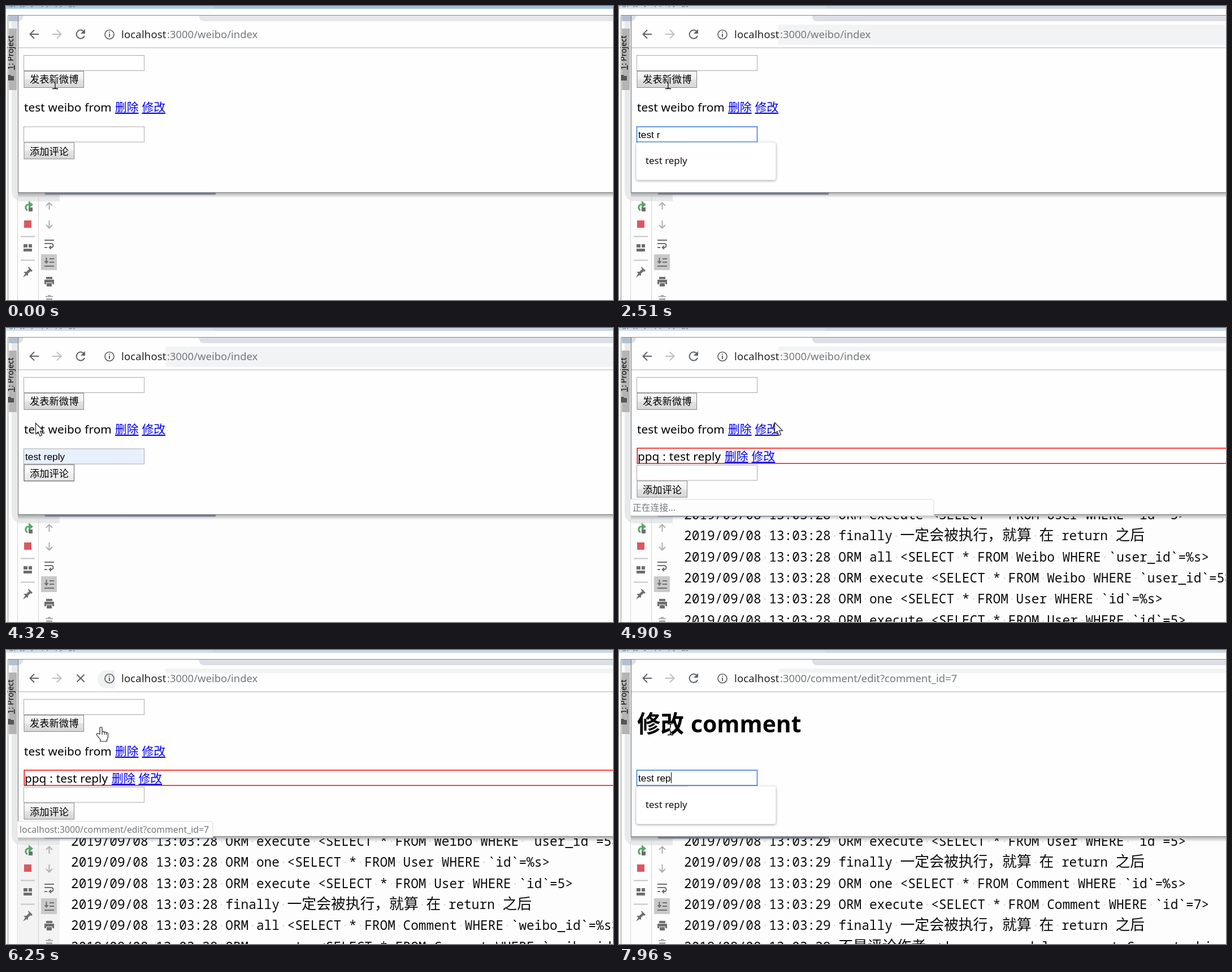
These frames come from a looping animation (1074x521 px, 8000 ms). An HTML page:

```html
<!DOCTYPE html>
<html lang="zh-CN">
<head>
<meta charset="utf-8">
<title>Comment form</title>
<style>
  html, body { margin: 0; width: 100%; height: 100%; overflow: hidden; background: #fdfdfd; }
  svg { display: block; width: 1074px; height: 521px; font-family: "Noto Sans", "Noto Sans CJK SC", sans-serif; }
  text { white-space: pre; }
  .page { font-size: 20.8px; word-spacing: .5px; }
  .link { fill: #00e; text-decoration: underline; }
  .btn { font-size: 17.3px; }
  .url { font-size: 18.45px; fill: #74787c; }
  .host { fill: #222; letter-spacing: .2px; }
  .item { font-size: 16.9px; fill: #111; }
  .status { font-size: 15.8px; fill: #74787c; }
  .field { font: 17.3px "Liberation Sans", sans-serif; }
  .log { font: 22.77px "Noto Sans Mono", monospace; fill: #0c0c0c; }
  .han { font: 300 25.8px "Noto Sans CJK SC", sans-serif; }
  .line { fill: none; stroke: #5f6368; stroke-width: 2; }
  .pop { filter: drop-shadow(0 1px 2px rgba(0,0,0,.4)); }
  #beam { mix-blend-mode: difference; }
</style>
</head>
<body>
<svg viewBox="0 0 1074 521" xmlns="http://www.w3.org/2000/svg">
  <defs>
    <linearGradient id="face" x2="0" y2="1">
      <stop offset="0" stop-color="#f8f8f8"/><stop offset=".48" stop-color="#f0f0f0"/>
      <stop offset=".52" stop-color="#e4e4e4"/><stop offset="1" stop-color="#d6d6d6"/>
    </linearGradient>
    <linearGradient id="shade" x2="0" y2="1">
      <stop offset="0" stop-color="#000" stop-opacity=".3"/><stop offset="1" stop-color="#000" stop-opacity="0"/>
    </linearGradient>
    <clipPath id="logClip"><path d="M96 334H1074V521H96Z"/></clipPath>
    <clipPath id="winClip"><path d="M20 17H1074V521H20Z"/></clipPath>
  </defs>

  <rect width="1074" height="521" fill="#fdfdfd"/>

  <!-- editor around the browser -->
  <g data-t="0-500"><path d="M0 0H1074V5H0Z" fill="#a5bfdd"/><path d="M0 0H368V5H0Z" fill="#adc7e2"/></g>
  <g data-t="500-8000"><path d="M0 0H1074V5H0Z" fill="#c9d6e3"/><path d="M0 0H366V5H0Z" fill="#d0dde8"/></g>
  <text x="5" y="-2" font-size="14" fill="#345" opacity=".6">gp jy  y app  py  gy</text>
  <path d="M21 17V331Q21 344 34 344H95V331H21V17H10V326Q10 346 30 346H95V334H21Z" fill="#e8e9ea"/>
  <path d="M5 17H21V27H5Z" fill="#b3c0cf"/>
  <path d="M5 40H19V149H5Z" fill="#b4b4b4"/>
  <text transform="translate(13 113) rotate(-90)" font-size="13.9"><tspan text-decoration="underline">1</tspan>: Project</text>
  <path d="M4 122H8L9 124H14V132H4Z" fill="#555"/>
  <path d="M3.5 521V16.5H1074" fill="none" stroke="#85898e"/>
  <path d="M22 347H95V521H22Z" fill="#f3f3f3" data-t="5020-6760"/>
  <path d="M20.5 340V521M57.5 338V521" stroke="#d2d2d2"/>
  <path d="M69 331H371V334.5H69Z" fill="#a0a8bd"/>

  <!-- run tool buttons -->
  <path d="M45 352H38A5.5 5.5 0 0 0 38 362" fill="none" stroke="#59a869" stroke-width="3"/>
  <path d="M40 345L48 352L40 359Z" fill="#59a869"/>
  <path d="M40 357H47V364H40Z" fill="#6e6e6e"/>
  <path d="M32 380H45V393H32Z" fill="#db5860"/>
  <path d="M26 408.5H51M26 450.5H51" stroke="#c4c4c4" stroke-width="2"/>
  <path d="M31 422H38V428H31ZM40 422H46V428H40ZM31 430H46V435H31Z" fill="#6e6e6e"/>
  <path d="M40 462L47 469L45 471L43.5 470L39 474L39 478L36 477L30 481L34 474L31 471H36L41 466L39 464Z" fill="#6e6e6e"/>
  <path d="M76.5 361V348M71 354L76.5 348.5L82 354" fill="none" stroke="#afafaf" stroke-width="2"/>
  <path d="M76.5 380V393M71 388L76.5 393.5L82 388" fill="none" stroke="#afafaf" stroke-width="2"/>
  <path d="M68 415H85M68 421H81A3.7 3.7 0 0 1 81 428H77M68 428H73" fill="none" stroke="#6e6e6e" stroke-width="2"/>
  <path d="M80 424V432L75 428Z" fill="#6e6e6e"/>
  <path d="M62 440H90V468H62Z" fill="#c9c9c9"/>
  <path d="M68 461H85M77 448H85M77 454H85M71.5 446V455" stroke="#6e6e6e" stroke-width="2"/>
  <path d="M67.5 452H75.5L71.5 457Z" fill="#6e6e6e"/>
  <path d="M71 480H82V484H71ZM68 485H85V493H82V490H71V493H68ZM72 491H81V497H72Z" fill="#6e6e6e"/>
  <path d="M74 512H79V514H83V516H70V514H74ZM71 518H82V521H71Z" fill="#afafaf"/>

  <g clip-path="url(#logClip)" data-t="4900-8000"><g id="log" class="log"></g></g>

  <!-- browser window -->
  <path d="M21 331H1074V340H21Z" fill="url(#shade)"/>
  <path d="M21 17H1074V331H21Z" fill="#fefefe"/>
  <path d="M341 17H1074V27H351Q342 27 341 17Z" fill="#e7e7eb" data-t="0-500"/>
  <path d="M341 17H1074V27H351Q342 27 341 17Z" fill="#dddfe7" data-t="500-8000"/>
  <path d="M22 17H31Q29 26 22 27Z" fill="#dde0e6"/>
  <path d="M178 33H1074V69H178A18 18 0 0 1 178 33Z" fill="#f1f3f4" data-t="500-1980"/>
  <path d="M282 33H1074V69H282Z" fill="#f1f3f4" data-t="1980-4900"/>
  <path d="M282 33H1074V41H282Z" fill="#f1f3f4" data-t="4900-8000"/>
  <path d="M178 36H193V68H178A16 16 0 0 1 178 36Z" fill="#f0f1f2" data-t="6130-6490"/>
  <path d="M22 74H1074" stroke="#c6c8ca" stroke-width="1.3"/>
  <path class="line" d="M58 50H43M50 42.5L42.5 50L50 57.5"/>
  <path class="line" d="M82 50H97M90 42.5L97.5 50L90 57.5" style="stroke:#bdbfc1"/>
  <g data-t="0-4440,4900-6130,6490-8000">
    <path class="line" d="M138 45.5A7.5 7.5 0 1 0 139 53"/><path d="M140 41V49H132Z" fill="#5f6368"/>
  </g>
  <path class="line" d="M125.5 43.5L138.5 56.5M138.5 43.5L125.5 56.5" data-t="4440-4900,6130-6490"/>
  <circle class="line" cx="183" cy="50.5" r="8" style="stroke-width:1.7"/>
  <path class="line" d="M183 49V55M183 45.5V47.3"/>
  <text class="url host" x="204" y="57">localhost</text>
  <text class="url" x="285" y="57" data-t="0-6490">:3000/weibo/index</text>
  <text class="url" x="285" y="57" data-t="6490-8000">:3000/comment/edit?comment_id=7</text>

  <g data-t="0-6490">
    <rect x="31.5" y="87.5" width="213" height="27" fill="#fff" stroke="#a9a9a9"/>
    <rect x="32" y="115.5" width="105.5" height="29" fill="url(#face)" stroke="#888"/>
    <text class="btn" x="42" y="136.3">发表新微博</text>
    <text class="page" x="32" y="187">test weibo from</text>
    <text class="page link" x="193" y="187">删除</text>
    <text class="page link" x="240.5" y="187">修改</text>
  </g>
  <g data-t="4900-6490">
    <path d="M1080 213H32.3V240H1080" fill="none" stroke="#f00" stroke-width="1.6"/>
    <text class="page" x="33" y="235">ppq : test reply</text>
    <text class="page link" x="187" y="235">删除</text>
    <text class="page link" x="234.5" y="235">修改</text>
  </g>
  <g data-t="6490-8000" font-weight="700">
    <text x="32" y="146" font-size="41.6">修改</text>
    <text x="127" y="146" font-size="40.9">comment</text>
  </g>

  <g id="form">
    <rect x="32" y="242" width="88.5" height="29" fill="url(#face)" stroke="#888"/>
    <rect x="32" y="242" width="88.5" height="29" fill="#fff" fill-opacity=".4" stroke="#666" data-t="4050-4750"/>
    <text class="btn" x="42" y="264" data-t="0-6490">添加评论</text>
    <text class="btn" x="42" y="263" data-t="6490-8000">提交修改</text>
    <rect id="box" x="31.5" y="214" width="213" height="27"/>
    <text id="value" class="field" x="34" y="233.5"></text>
    <path id="caret" d="M.5 218V237" stroke="#000"/>
  </g>

  <path d="M21.5 17V330.5H1074" fill="none" stroke="#7f8286" stroke-width="1.2"/>

  <!-- suggestion lists -->
  <g clip-path="url(#winClip)" data-t="620-1980">
    <rect class="pop" x="30.5" y="0" width="247" height="213" rx="4" fill="#fff"/>
    <path d="M257 17H277V213H257Z" fill="#f1f1f1"/>
    <path d="M257 17H277V145H257Z" fill="#c9c9c9"/>
    <path d="M257 145H277V172H257Z" fill="#c9c9c9" data-t="1830-1980"/>
    <path d="M262 190L266.5 194.5L271 190" fill="none" stroke="#444" stroke-width="2.5"/>
    <g id="early" data-t="620-900"></g>
    <g id="late" data-t="900-1980"></g>
  </g>
  <g data-t="1980-3260,7690-8000">
    <rect class="pop" x="30.5" y="241.5" width="247" height="67" rx="4" fill="#fff"/>
    <path d="M31 250H277V298H31Z" fill="#e9e9ea" data-t="3010-3260"/>
    <text class="item" x="47" y="279.5">test reply</text>
  </g>

  <!-- status bubbles -->
  <g data-t="4900-5320">
    <path d="M19.5 332.5V303.5H552Q557 303.5 557 308V332.5Z" fill="#fdfdfd" stroke="#dcdcdc"/>
    <text class="status" x="24" y="323.5" data-t="4900-5170">正在连接...</text>
    <text class="status" x="24" y="323.5" opacity=".5" data-t="5170-5320">正在连接...</text>
  </g>
  <g data-t="5890-6760">
    <path d="M19.5 332.5V303.5H361Q366 303.5 366 308V332.5Z" fill="#fdfdfd" stroke="#dcdcdc"/>
    <text class="status" x="24" y="323.5" data-t="5890-6610">localhost:3000/comment/edit?comment_id=7</text>
    <text class="status" x="24" y="323.5" opacity=".75" data-t="6610-6760">localhost:3000/comment/edit?comment_id=7</text>
  </g>

  <path id="beam" d="M-5 -10H-2Q0 -10 0 -8Q0 -10 2 -10H5M0 -8V7M-5 9.5H-2Q0 9.5 0 7Q0 9.5 2 9.5H5" fill="none" stroke="#fff" stroke-width="1.5"/>
  <path id="arrow" d="M.5 .5V20L5 16L8 23.5L11.5 22L8.5 14.8H14.5Z" fill="#fff" stroke="#222" stroke-width="1.2"/>
  <path id="hand" d="M-2 12V1.5Q-2 -.5 0 -.5T2 1.5V8Q4 6.5 6 8.5Q8 7.5 9.5 9.5Q12.5 9 12.5 12V17Q12.5 20 10.5 22V25H-1V22Q-4 18 -7.5 13.5Q-8 10.5 -5 11ZM2 8V13M6 9V13M9.5 10V13.5" fill="#fff" stroke="#222" stroke-width="1.2"/>
</svg>

<script>
const LOOP = 8000, ROW = 37.33;
const $ = id => document.getElementById(id);

// start, value, caret shown, state (0 plain, 1 focus, 2 focus + autofill, 3 autofill), vertical shift
const FIELD = [
  [0, '', 0, 0, 0], [500, '', 1, 1, 0], [900, 't', 1, 1, 0], [1150, 'te', 1, 1, 0],
  [1400, 'tes', 1, 1, 0], [1520, 'test', 1, 1, 0], [1830, 'test ', 1, 1, 0],
  [1980, 'test r', 1, 1, 0], [2510, 'test r', 0, 1, 0], [3010, 'test reply', 0, 2, 0],
  [3380, 'test reply', 1, 2, 0], [3780, 'test reply', 0, 2, 0], [4200, 'test reply', 0, 3, 0],
  [4900, '', 0, 0, 29], [6490, 'test reply', 0, 0, -1], [6910, 'test reply', 1, 1, -1],
  [7440, 'test reply', 0, 1, -1], [7690, 'test repl', 1, 1, -1],
  [7810, 'test rep', 0, 1, -1], [7960, 'test rep', 1, 1, -1]
];

const POINTER = [
  [0, 'beam', 87, 137], [620, 'arrow', 85, 135], [1980, 'beam', 87, 137], [3780, 'beam', 82, 139],
  [3900, 'arrow', 72, 150], [4050, 'arrow', 52, 168], [4750, 'arrow', 205, 172],
  [4900, 'arrow', 275, 167], [5470, 'arrow', 235, 160], [5620, 'arrow', 193, 150],
  [5740, 'arrow', 157, 144], [5890, 'hand', 168, 137], [6490, 'arrow', 130, 136],
  [6610, 'beam', 98, 135], [6760, 'beam', 95, 135], [6910, 'beam', 91, 141]
];

// start, first visible log row
const SCROLL = [[0, 0.21], [5170, 3], [6490, 9], [6760, 11]];

const sql = (kind, table, cond) => `ORM ${kind} <SELECT * FROM ${table} WHERE \`${cond}>`;
const query = (table, key, id, kind = 'one') =>
  [sql(kind, table, key + '`=%s'), sql('execute', table, key + '`=' + id)];
const done = 'finally 一定会被执行，就算 在 return 之后';
const first = [
  sql('execute', 'User', 'id`=5'), done, ...query('Weibo', 'user_id', 5, 'all'),
  ...query('User', 'id', 5), done, ...query('Comment', 'weibo_id', 1, 'all')
].map(s => '2019/09/08 13:03:28 ' + s);
const second = [
  'expired False 1567922544 1567919009.9134166', ...query('User', 'id', 5), done,
  ...query('Comment', 'id', 7), done, '不是评论作者 <demo_app.models.comment.Comment object at 0x04>'
].map(s => '2019/09/08 13:03:29 ' + s);

// spaces show as pale dots
const markup = s => s.replace(/</g, '&lt;')
  .replace(/ /g, '·').replace(/·/g, '<tspan fill="#dedede">·</tspan>')
  .replace(/[\u4e00-\u9fff，]+/g, '<tspan class="han">$&</tspan>');
$('log').innerHTML = [...first, ...second]
  .map((s, i) => `<text x="115" y="${i * ROW}">${markup(s)}</text>`).join('');

const list = (id, items) => $(id).innerHTML = items
  .map((s, i) => `<text class="item" x="47" y="${56.5 + i * 46.2}">${s}</text>`).join('');
list('early', ['weibo', 'hello', 'test weibo', 'test reply']);
list('late', ['test weibo', 'test reply', 'test test', 'test content']);

const timed = [...document.querySelectorAll('[data-t]')].map(el =>
  [el, el.dataset.t.split(',').map(r => r.split('-').map(Number))]);
const at = (table, t) => table.filter(row => row[0] <= t).pop();
const toggle = (el, on) => { el.style.display = on ? '' : 'none'; };

function drawField([, text, caret, state, dy]) {
  const focus = state === 1 || state === 2, value = $('value'), box = $('box');
  $('form').setAttribute('transform', `translate(0 ${dy})`);
  if (value.textContent !== text) value.textContent = text;
  box.setAttribute('fill', state > 1 ? '#e8f0fe' : '#fff');
  box.setAttribute('stroke', focus ? '#4a86e0' : '#a9a9a9');
  box.setAttribute('stroke-width', focus ? 1.7 : 1);
  toggle($('caret'), caret);
  if (caret) {
    const x = Math.round(34 + value.getComputedTextLength());
    $('caret').setAttribute('transform', `translate(${x} 0)`);
  }
}

function render(t) {
  for (const [el, spans] of timed) toggle(el, spans.some(([a, b]) => t >= a && t < b));
  drawField(at(FIELD, t));
  $('log').setAttribute('transform', `translate(0 ${347 - at(SCROLL, t)[1] * ROW})`);
  const [, shape, x, y] = at(POINTER, t);
  for (const id of ['beam', 'arrow', 'hand']) toggle($(id), id === shape);
  $(shape).setAttribute('transform', `translate(${x} ${y})`);
}

const start = performance.now();
function tick() {
  render((performance.now() - start) % LOOP);
  requestAnimationFrame(tick);
}
tick();
</script>
</body>
</html>
```
